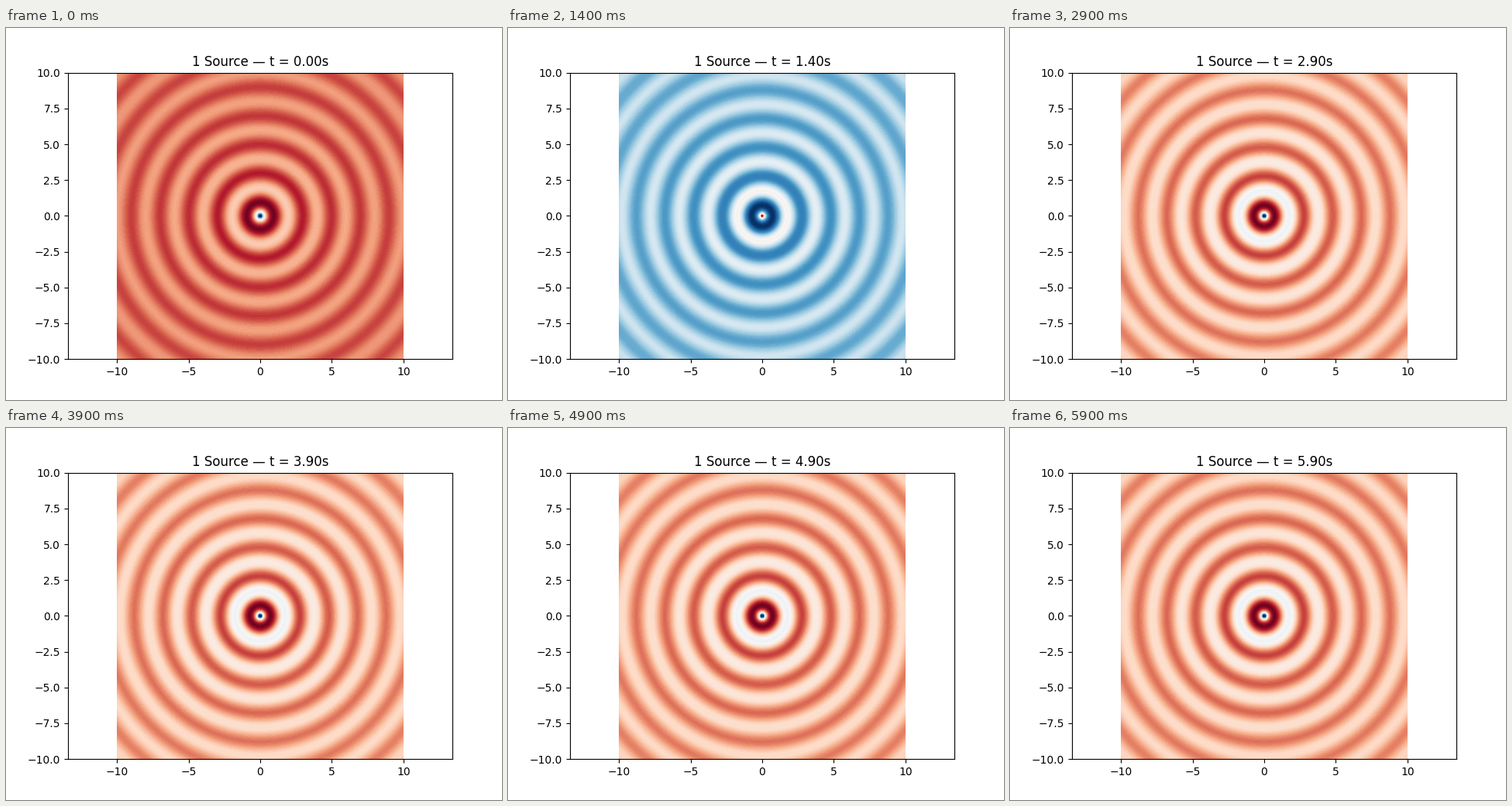
These frames come from a looping animation (640x480 px, 6 s). A matplotlib script:

```python
import numpy as np
import matplotlib.pyplot as plt
from matplotlib.animation import FuncAnimation

FRAMES = 60
INTERVAL = 100
WAVELENGTH = 2.0
FREQUENCY = 1.0

axis = np.linspace(-10, 10, 200)
X, Y = np.meshgrid(axis, axis)
R = np.hypot(X, Y)

fig, ax = plt.subplots(figsize=(6.4, 4.8), dpi=100)


def wave(t):
    """Outgoing circular wave, fading with the root of the distance."""
    phase = 2 * np.pi * (R / WAVELENGTH - FREQUENCY * t)
    return np.cos(phase) / np.sqrt(R)


def update(i):
    t = i * INTERVAL / 1000
    ax.clear()
    # Levels follow each frame's own range, so the zero tone shifts with time.
    ax.contourf(X, Y, wave(t), levels=100, cmap="RdBu")
    ax.axis("equal")
    ax.set_title(f"1 Source — t = {t:.2f}s")
    return []


anim = FuncAnimation(fig, update, frames=FRAMES, interval=INTERVAL,
                     init_func=lambda: update(0), repeat=True, repeat_delay=0)
plt.show()
```
